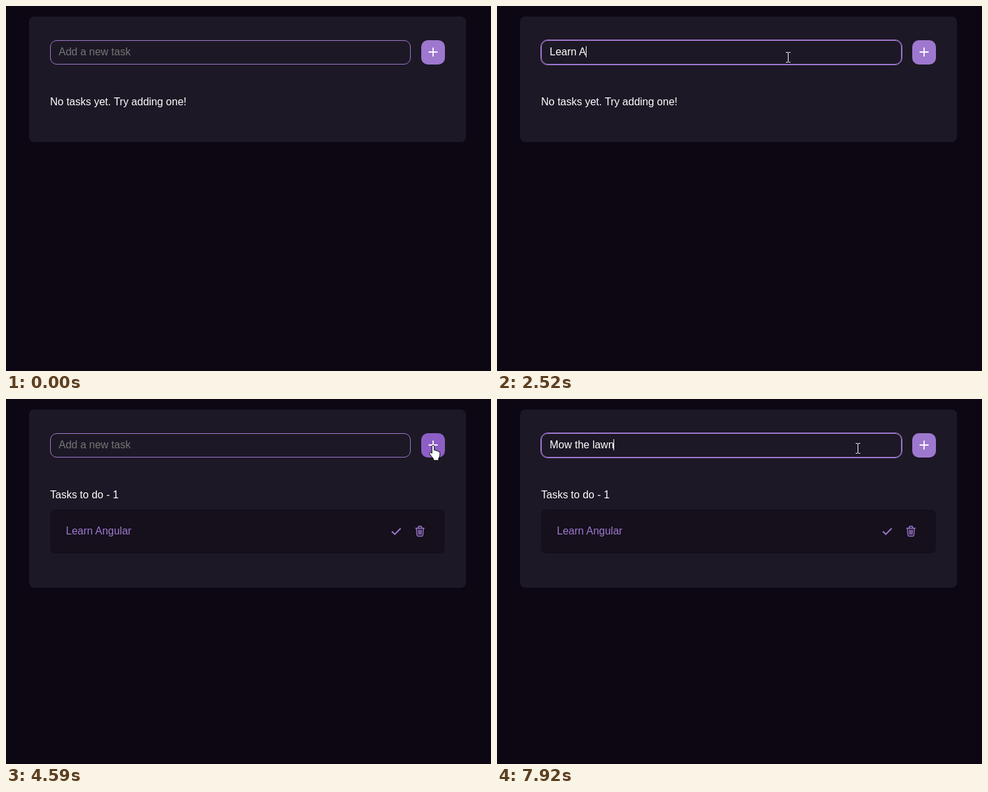
An HTML page for the animation above (8 s loop, 737 px wide and 555 px high).

```html
<!DOCTYPE html>
<html lang="en">
<head>
<meta charset="utf-8">
<title>Task list</title>
<style>
  html, body { margin: 0; width: 100%; height: 100%; overflow: hidden; background: #0d0714; }
  svg { display: block; }
  text { font: 16px "Liberation Sans", Arial, sans-serif; white-space: pre; fill: #fff; }
  .card { fill: #1d1825; }
  .item { fill: #15101c; }
  .line { fill: none; stroke: #9e78cf; }
  .icon { stroke-width: 1.4; stroke-linecap: round; stroke-linejoin: round; }
  #hint { fill: #757575; }
  #task text { fill: #9e78cf; }
  #button { fill: #9e78cf; }
  #button.hover { fill: #8d5fc6; }
  #arrow, #hand { fill: #fff; stroke: #000; stroke-linejoin: round; }
</style>
</head>
<body>
<svg width="737" height="555" viewBox="0 0 737 555">
  <rect id="card" class="card" x="35" y="16" width="664" height="191" rx="8"/>
  <rect id="field" class="line" x="67.5" y="52.5" width="547" height="36" rx="9.5"/>
  <rect id="ring" class="line" x="66.5" y="51.5" width="549" height="38" rx="10.5"/>
  <text id="hint" x="80" y="75">Add a new task</text>
  <text id="typed" x="80" y="75"></text>
  <rect id="caret" width="1" height="17" fill="#fff"/>
  <rect id="button" x="631" y="52" width="36" height="37" rx="10"/>
  <path d="M642.8 70H655.2M649 63.8V76.2" stroke="#fff" stroke-width="1.8" stroke-linecap="round"/>
  <text id="status" x="67" y="151"></text>
  <g id="task">
    <rect class="item" x="67" y="168" width="600" height="67" rx="8"/>
    <text x="91" y="206">Learn Angular</text>
    <path class="line" stroke-width="2" d="M586.3 201.2L590.8 205.6L599.7 196.7"/>
    <path class="line icon" d="M622.5 196.5H635.5M626.5 196V194.5Q626.5 193.5 627.5 193.5H630.5Q631.5 193.5 631.5 194.5V196M623.7 197L624.5 207Q624.7 208.5 626 208.5H632Q633.3 208.5 633.5 207L634.3 197M626.8 199.3L627 205.7M629 199.3V205.7M631.2 199.3L631 205.7"/>
  </g>
  <g id="cursor">
    <path id="arrow" d="M.5 .5V17L4.3 13.4L6.8 19L9.3 17.9L6.9 12.3H12Z"/>
    <path id="beam" fill="none" stroke="#fff" d="M-3 -7.5H0M1 -7.5H4M.5 -7V7M-3 7.5H0M1 7.5H4"/>
    <path id="hand" d="M-1.8 1.2a1.8 1.8 0 0 1 3.6 0V7q2.6 -.9 3 .9q2.4 -.7 3 1q2.3 -.4 2.4 1.6V15q-.3 2.5 -1.7 4V22.3H.5V20L-4.8 13.2q-1.5 -2.2 .3 -3q1.2 -.5 2.7 1.5Z"/>
  </g>
</svg>
<script>
const LOOP = 8000;
const BLINK = 540;   // caret half period
const STEP = 44;     // pointer refresh interval
const FOCUS = 850, BLUR = 4550, ADDED = 4590, REFOCUS = 5640;

// Words are typed at an even pace
const words = [
  { text: "Learn ", at: 1800, gap: 110 },
  { text: "Angular", at: 2520, gap: 81 },
  { text: "Mow ", at: 6920, gap: 100 },
  { text: "the ", at: 7300, gap: 70 },
  { text: "lawn", at: 7670, gap: 83 }
];

// Each move is a quadratic curve: from, bend, to
const field = [442, 78], plus = [649, 71];
const moves = [
  { start: 50, end: 800, curve: [[652, 540], [442, 250], field] },
  { start: 3550, end: 4130, curve: [field, [534, 187], plus] },
  { start: 5210, end: 5600, curve: [plus, [600, 80], [548, 75]] }
];

const el = {};
document.querySelectorAll("[id]").forEach(node => el[node.id] = node);

const show = (node, on) => node.setAttribute("visibility", on ? "visible" : "hidden");
const write = (node, text) => {
  if (node.textContent !== text) node.textContent = text;
};

function typing(t) {
  let text = "", lastKey = 0;
  for (const word of words) {
    const current = (word.at < ADDED) === (t < ADDED);
    if (!current || t < word.at) continue;
    const count = Math.min(word.text.length, 1 + Math.floor((t - word.at) / word.gap));
    text += word.text.slice(0, count);
    lastKey = word.at + (count - 1) * word.gap;
  }
  return { text, lastKey };
}

function pointerAt(t) {
  const move = moves.filter(m => t >= m.start).pop();
  if (!move) return null;
  const { start, end, curve: [from, bend, to] } = move;
  if (t >= end) return to;
  const elapsed = Math.floor((t - start) / STEP) * STEP;
  const rest = Math.pow(1 - elapsed / (end - start), 1.47);
  const k = 1 - rest;
  return from.map((v, i) => Math.round(rest * rest * v + 2 * rest * k * bend[i] + k * k * to[i]));
}

function drawPointer(t) {
  const pos = pointerAt(t);
  const [x, y] = pos || [0, 0];
  const inRow = y >= 52 && y < 89;
  const onButton = inRow && x >= 631 && x < 667;
  const onField = inRow && x >= 67 && x < 615;
  el.cursor.setAttribute("transform", `translate(${x} ${y})`);
  show(el.hand, onButton);
  show(el.beam, onField);
  show(el.arrow, pos && !onButton && !onField);
  el.button.classList.toggle("hover", onButton);
}

function drawField(t) {
  const focusedAt = t >= REFOCUS ? REFOCUS : FOCUS;
  const focus = t >= focusedAt && (t < BLUR || t >= REFOCUS);
  const { text, lastKey } = typing(t);
  const idle = t - Math.max(focusedAt, lastKey);
  write(el.typed, text);
  show(el.hint, !text);
  show(el.ring, focus);
  show(el.caret, focus && idle % (2 * BLINK) < BLINK);
  const width = text ? el.typed.getComputedTextLength() : 0;
  el.caret.setAttribute("x", Math.floor(80 + width));
  el.caret.setAttribute("y", text ? 61 : 62);
}

function drawList(t) {
  const added = t >= ADDED;
  write(el.status, added ? "Tasks to do - 1" : "No tasks yet. Try adding one!");
  el.card.setAttribute("height", added ? 271 : 191);
  show(el.task, added);
}

const origin = performance.now();
function draw() {
  const t = (performance.now() - origin) % LOOP;
  drawField(t);
  drawList(t);
  drawPointer(t);
  requestAnimationFrame(draw);
}
draw();
</script>
</body>
</html>
```
